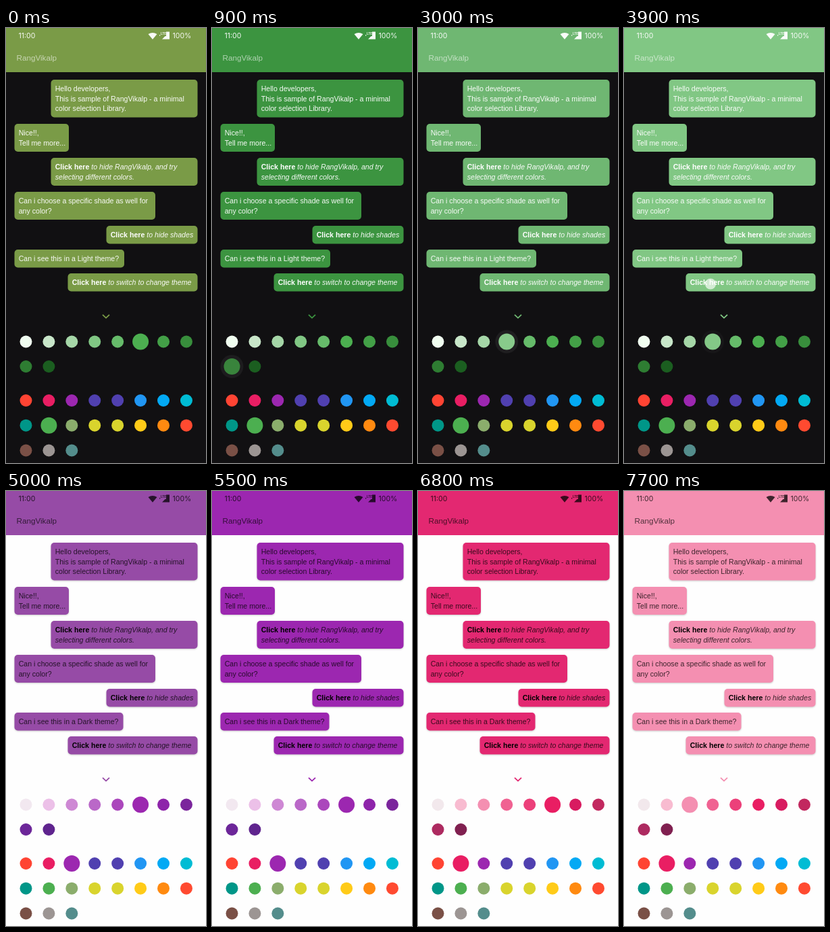
Animation, 296 px wide and 640 px high, one loop 8 s. Source, as an HTML page:

```html
<!DOCTYPE html>
<html lang="en">
<head>
<meta charset="utf-8">
<title>Color picker</title>
<style>
  html, body { margin: 0; height: 100%; overflow: hidden; background: #111; }
  svg { display: block; width: 296px; height: 640px; background: var(--bg); }
  text { font: 10.6px "Liberation Sans", Arial, sans-serif; fill: var(--ink); fill-opacity: var(--soft); white-space: pre; }
  .bold { font-weight: 700; fill-opacity: 1; }
  .it { font-style: italic; }
  .title { font-size: 11.7px; fill-opacity: var(--dim); }
  .status text { font: 10.5px Inter, sans-serif; }
  .status .lte { font-size: 4.5px; font-weight: 700; }
  .status path { fill: var(--ink); fill-opacity: var(--soft); }
  .accent { fill: var(--accent); }
  .bubbles rect { filter: drop-shadow(0 1px 1px rgba(0, 0, 0, var(--shadow))); }
  .chevron { fill: none; stroke: var(--accent); stroke-width: 1.8; }
</style>
</head>
<body>
<svg id="stage" viewBox="0 0 296 640">
  <rect class="accent" width="296" height="65"/>
  <g class="status">
    <text x="18.5" y="15">11:00</text>
    <path d="M210.5 8.9Q217 4.9 223.500 8.900L217 16.800Z"/>
    <path d="M242 5.500V16.500H231L235.500 12H237V5.500Z"/>
    <path d="M227 10h1.200v1.500h-1.200z"/>
    <text class="lte" x="229" y="9.600">LTE</text>
    <text x="246.500" y="15">100%</text>
  </g>
  <text class="title" x="15.500" y="47.500">RangVikalp</text>
  <g class="bubbles" id="bubbles"></g>
  <path class="chevron" d="M143 421.800L148 426.600L153 421.800"/>
  <g id="dots"></g>
  <circle id="ripple" r="17"/>
  <circle id="finger" r="8" fill="#fff"/>
</svg>
<script>
const LOOP = 8000;
const $ = id => document.getElementById(id);
const stage = $('stage');

function add(parent, tag, attrs, content = '') {
  const el = document.createElementNS('http://www.w3.org/2000/svg', tag);
  for (const k in attrs) el.setAttribute(k, attrs[k]);
  el.textContent = content;
  parent.append(el);
  return el;
}

// Chat bubbles: left, right, top, lines ("*" marks a clickable line, "_" an italic one)
const bubbles = [
  [66.5, 283.5, 76, 'Hello developers,', 'This is sample of RangVikalp - a minimal', 'color selection Library.'],
  [12.5, 93, 141, 'Nice!!,', 'Tell me more...'],
  [66.5, 283.5, 191, '* to hide RangVikalp, and try', '_selecting different colors.'],
  [12.5, 221, 241, 'Can i choose a specific shade as well for', 'any color?'],
  [148.5, 283.5, 291, '* to hide shades'],
  [12.5, 175, 326, 'Can i see this in a Light theme?'],
  [91.5, 283.5, 361, '* to switch to change theme']
].map(([x, right, y, ...lines]) => {
  const rect = add($('bubbles'), 'rect', {
    class: 'accent', x, y, rx: 5, width: right - x, height: 26.5 + (lines.length - 1) * 14.5
  });
  const texts = lines.map((line, i) => {
    const text = add($('bubbles'), 'text', { x: x + 6.2, y: y + 17 + i * 14.7 });
    if (line[0] === '*') add(text, 'tspan', { class: 'bold' }, 'Click here');
    const styled = '*_'.includes(line[0]);
    add(text, 'tspan', { class: styled ? 'it' : '' }, styled ? line.slice(1) : line);
    return text;
  });
  return { rect, texts };
});
const question = bubbles[5];

const list = s => s.split(' ').map(c => '#' + c);
const palette = list('ff4433 e91e63 9c27b0 5040b0 4a42b2 2196f3 03a9f4 00bcd4 ' +
  '009688 4caf50 8bad6c d9d42d d9d42d ffcb18 ff8a10 ff4a30 7a5046 9c9593 548d8c');
palette[4] = palette[3];
const shades = {
  9: list('f0fdf0 c8e6c9 a5d6a7 81c784 66bb6a 4caf50 43a047 388e3c 2e7d32 1b5e20'),
  2: list('f2e8f0 ecc0e8 ce88d4 ba68c8 ab47bc 9c27b0 8e24aa 7b259c 6c2699 5f248e'),
  1: list('f2e8ec f8bbd0 f48fb1 f06292 ec407a e91e63 d81b60 c2285f ad2a60 802050')
};

const spot = (i, tops) => ({ cx: 29.5 + i % 8 * 33.92, cy: tops[i >> 3] });
const shadeSpot = i => spot(i, [461.5, 498]);
const hueSpot = i => spot(i, [548, 584.7, 621.5]);
const shadeDots = shades[9].map((c, i) => add($('dots'), 'circle', { ...shadeSpot(i), r: 9 }));
const hueDots = palette.map((c, i) => add($('dots'), 'circle', { ...hueSpot(i), r: 9, fill: c }));

// Selections: when picked, hue, shade, colour fade start and end
const picks = [
  [-500, 9, 5, -500, -400],
  [690, 9, 8, 700, 1250],
  [2680, 9, 3, 2700, 3300],
  [4760, 2, 5, 4750, 5250],
  [5680, 2, 3, 5650, 6100],
  [6400, 1, 5, 6450, 7050],
  [7430, 1, 2, 7420, 7690]
];
// Taps: touch down, touch up, ripple end, position
const taps = [
  [660, 820, 1000, shadeSpot(8)],
  [2580, 2780, 3950, shadeSpot(3)],
  [3880, 4080, 0, { cx: 128, cy: 376.5 }],
  [4760, 4900, 4980, hueSpot(2)],
  [5660, 5830, 6050, shadeSpot(3)],
  [6270, 6460, 6700, hueSpot(1)],
  [7190, 7350, 7350, shadeSpot(2)]
];

const clamp = v => Math.min(1, Math.max(0, v));

// cubic-bezier(.4, 0, .2, 1)
function ease(p) {
  let lo = 0, hi = 1;
  for (let i = 0; i < 16; i++) {
    const u = (lo + hi) / 2, v = 1 - u;
    if (1.2 * v * v * u + 0.6 * v * u * u + u ** 3 < p) lo = u; else hi = u;
  }
  return 3 * lo * lo - 2 * lo ** 3;
}
const fade = (t, a, b) => t <= a ? 0 : t >= b ? 1 : ease((t - a) / (b - a));

const rgb = hex => [1, 3, 5].map(i => parseInt(hex.slice(i, i + 2), 16));
const mix = (a, b, p) => a.map((v, i) => v + (b[i] - v) * p);
const css = c => `rgb(${c.map(Math.round)})`;

function accentAt(t) {
  let c = mix(rgb('#7a9b47'), rgb('#4caf50'), clamp(t / 380));
  for (const [, hue, shade, a, b] of picks.slice(1))
    c = mix(c, rgb(shades[hue][shade]), fade(t, a, b));
  return c;
}

function place(el, at, opacity) {
  el.setAttribute('opacity', opacity);
  if (at) for (const k in at) el.setAttribute(k, at[k]);
}

function render(t) {
  const light = fade(t, 4080, 4420);
  const vars = {
    accent: css(accentAt(t)),
    bg: css(mix([17, 16, 18], [254, 254, 254], light)),
    ink: css(mix([255, 255, 255], [0, 0, 0], light)),
    soft: 0.95 - light * 0.2,
    dim: 0.58 + light * 0.08,
    shadow: light * 0.2
  };
  for (const k in vars) stage.style.setProperty('--' + k, vars[k]);

  const dark = light < 0.5;
  question.texts[0].firstChild.textContent = `Can i see this in a ${dark ? 'Light' : 'Dark'} theme?`;
  question.rect.setAttribute('width', dark ? 162.5 : 161);

  const n = picks.findLastIndex(p => p[0] <= t);
  const [at, hue, shade] = picks[n];
  const before = picks[n - 1] || picks[0];
  const grow = fade(t, at, at + 150);
  const radius = (now, old) => 9 + 3 * (now ? (old ? 1 : grow) : old ? 1 - grow : 0);
  shadeDots.forEach((dot, i) => {
    dot.setAttribute('fill', shades[hue][i]);
    dot.setAttribute('r', radius(i === shade, i === before[2]));
  });
  hueDots.forEach((dot, i) => dot.setAttribute('r', radius(i === hue, i === before[1])));

  const tap = taps.find(p => t >= p[0] && t < p[1]);
  place($('finger'), tap && tap[3], tap ? 0.65 * clamp((tap[1] - t) / 80) : 0);
  const wave = taps.find(p => t >= p[0] && t < p[2]);
  place($('ripple'), wave && wave[3], wave ? (dark ? 0.06 : 0.14) * clamp((wave[2] - t) / 120) : 0);
  $('ripple').setAttribute('fill', dark ? '#fff' : '#000');
}

const start = performance.now();
function tick() {
  render((performance.now() - start) % LOOP);
  requestAnimationFrame(tick);
}
tick();
</script>
</body>
</html>
```
